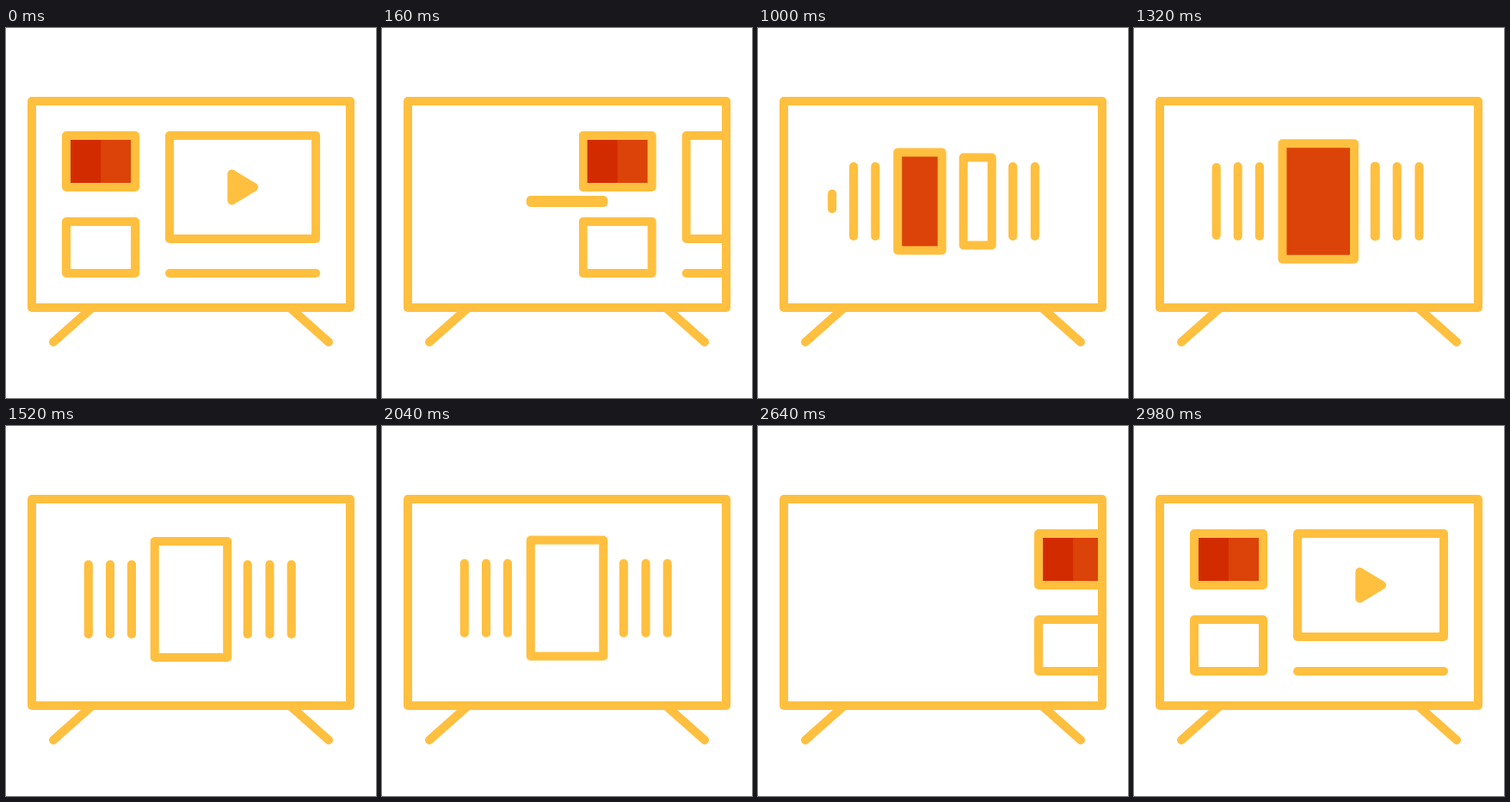
Write an HTML page without scripts that moves like this. It is 430 px wide and 430 px high and loops after 3000 ms.

```html
<!DOCTYPE html>
<html lang="en">
<head>
<meta charset="utf-8">
<title>TV menu</title>
<style>
  @property --slide { syntax: "<number>"; inherits: true; initial-value: 0; }
  @property --tall { syntax: "<number>"; inherits: true; initial-value: 0; }
  @property --grow { syntax: "<number>"; inherits: true; initial-value: 0; }

  html, body { margin: 0; width: 100%; height: 100%; overflow: hidden; background: #fff; }
  svg { display: block; width: 100vw; height: 100vh; }
  .line { fill: none; stroke: #ffbf3f; stroke-width: 10; stroke-linecap: round; stroke-linejoin: round; }

  .layout { animation: layout 3s infinite; }
  @keyframes layout {
    0% { transform: none; animation-timing-function: ease-in-out; }
    11.333%, 81.333% { transform: translateX(360px); animation-timing-function: ease-in-out; }
    99.333%, 100% { transform: none; }
  }

  .carousel {
    animation: slide 3s linear infinite, tall 3s linear infinite,
               grow 3s linear infinite, leave 3s linear infinite;
  }
  /* Three identical steps, each starting again from the red card */
  @keyframes slide {
    0%, 22.668%, 36.668% { --slide: 0; }
    15.333%, 29.333%, 43.333% { --slide: 0; animation-timing-function: cubic-bezier(.5, 0, .8, .95); }
    22.667%, 36.667%, 50.667%, 100% { --slide: 1; }
  }
  @keyframes tall {
    0% { --tall: 0; }
    4.667% { --tall: 0; animation-timing-function: ease-in-out; }
    11.333%, 100% { --tall: 1; }
  }
  @keyframes grow {
    0%, 6.667% { --grow: 0; }
    15.333%, 100% { --grow: 1; }
  }
  @keyframes leave {
    0% { transform: none; }
    63.333% { transform: none; animation-timing-function: cubic-bezier(.75, 0, .9, .3); }
    88%, 100% { transform: translateY(-190px); }
  }

  /* Items are centred on --x; --order staggers how the spines open */
  .carousel rect {
    --w: 0;
    --h: 81;
    --order: 0;
    --open: clamp(0, var(--grow) * 2.6 - var(--order) * .8, 1);
    --width: max(.1, var(--w));
    --height: max(.1, var(--h) * var(--open));
    x: calc((var(--x) - var(--width) / 2) * 1px);
    y: calc((201.5 - var(--height) / 2) * 1px);
    width: calc(var(--width) * 1px);
    height: calc(var(--height) * 1px);
    opacity: calc(var(--open) * 1000);
  }
  .carousel .spine { --x: calc(var(--from) - 25.2 * var(--slide)); }
  .carousel .second { --order: 1; }
  .carousel .outer { --order: 2; }
  .carousel .last {
    --h: calc(81 * max(0, 1 - 2 * var(--slide)));
    opacity: calc(min(var(--open), .7 - var(--slide)) * 1000);
  }
  .carousel .fresh {
    --x: 331.7;
    --h: calc(81 * max(0, 2 * var(--slide) - 1));
    opacity: calc((var(--slide) - .5) * 1000);
  }
  .carousel .leaving {
    --open: var(--tall);
    --x: calc(215 - 69 * var(--slide));
    --w: calc(84.5 * (1 - var(--slide)));
    --h: calc(135 - 54 * var(--slide));
    fill: #db4309;
  }
  .carousel .entering {
    --x: calc(281 - 66 * var(--slide));
    --w: calc(84.5 * var(--slide));
    --h: calc(81 + 54 * var(--slide));
  }
</style>
</head>
<body>
<svg viewBox="0 0 430 430">
  <clipPath id="screen"><rect x="32" y="87" width="366" height="236"/></clipPath>

  <g clip-path="url(#screen)">
    <g class="layout">
      <path fill="#d32b00" d="M70 125h40v60h-40z"/>
      <path fill="#db4309" d="M110 125h40v60h-40z"/>
      <g class="line">
        <rect x="70" y="125" width="80" height="60"/>
        <rect x="70" y="225" width="80" height="60"/>
        <rect x="190" y="125" width="170" height="120"/>
        <path d="M190 285H360"/>
        <path fill="#ffbf3f" d="M262.300 169.500L288 185L262.300 200.500Z"/>
      </g>
    </g>

    <g class="carousel line">
      <rect class="spine outer last" style="--from: 96"/>
      <rect class="spine second" style="--from: 121"/>
      <rect class="spine" style="--from: 146.200"/>
      <rect class="spine second" style="--from: 306"/>
      <rect class="spine outer" style="--from: 331.700"/>
      <rect class="fresh"/>
      <rect class="entering"/>
      <rect class="leaving"/>
    </g>
  </g>

  <g class="line">
    <path d="M99 326L55 365M331 326L375 365"/>
    <rect x="30" y="85" width="370" height="240"/>
  </g>
</svg>
</body>
</html>
```
